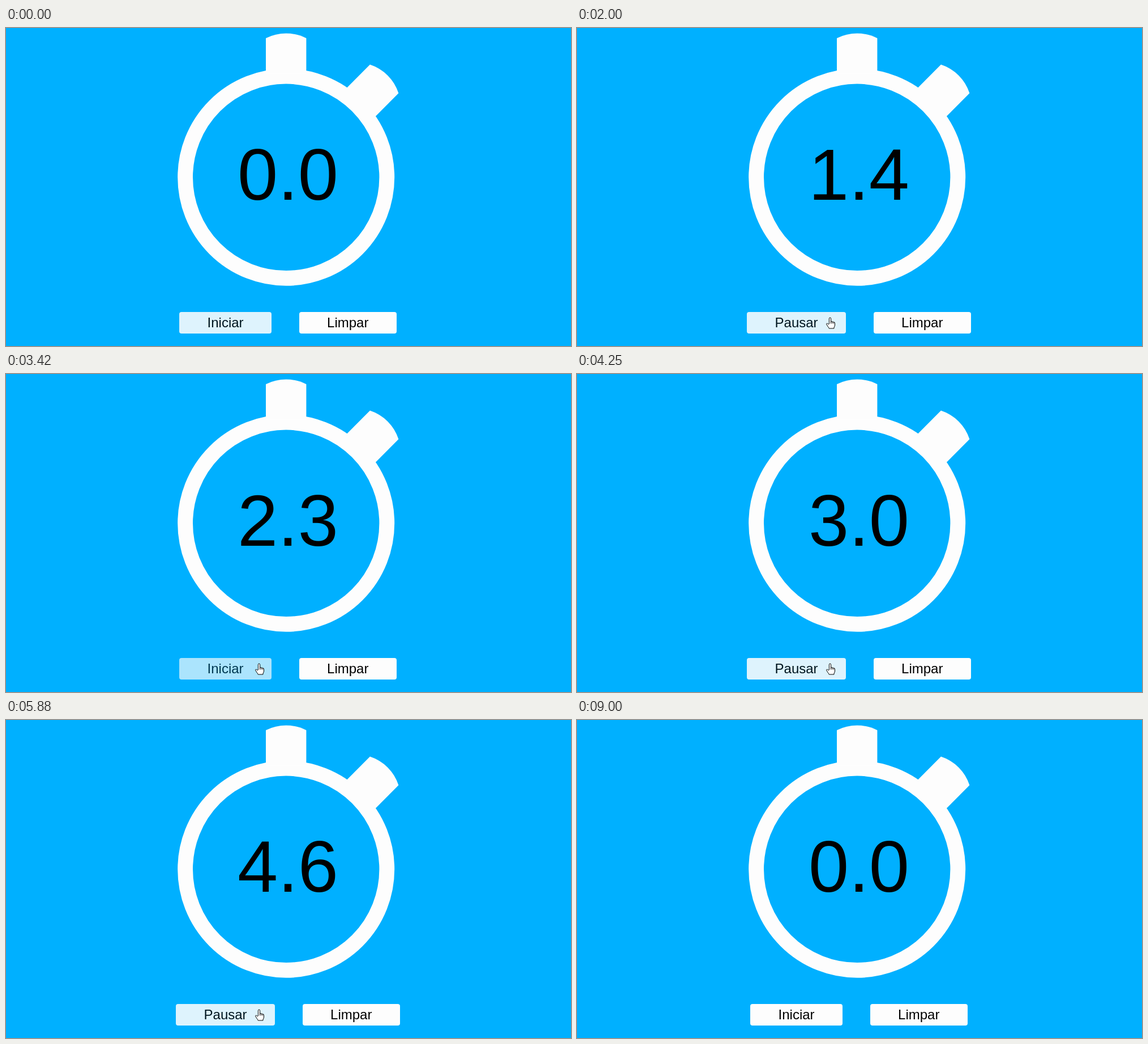
An HTML page without scripts for the animation above (9.42 s loop, 998x561 px).

```html
<!DOCTYPE html>
<html lang="pt">
<head>
<meta charset="utf-8">
<title>Cronômetro</title>
<style>
@property --tenths { syntax: "<integer>"; inherits: true; initial-value: 0; }
@property --secs { syntax: "<integer>"; inherits: true; initial-value: 0; }

html, body { margin: 0; width: 100%; height: 100%; overflow: hidden; }
body {
  --loop: 9420ms;
  position: relative;
  background: #00b0ff;
  color: #000;
  font-family: Arial, "Liberation Sans", sans-serif;
}
svg { position: absolute; left: 0; top: 0; }

/* integer rounding turns (n - 4.5) / 10 into whole seconds */
.time {
  --secs: calc((var(--tenths) - 4.5) / 10);
  position: absolute;
  left: 0;
  top: 186.5px;
  width: 996px;
  text-align: center;
  font-size: 128px;
  line-height: 144px;
  counter-reset: s var(--secs) d calc(var(--tenths) - 10 * var(--secs));
  animation: count var(--loop) step-end infinite;
}
.time::after { content: counter(s) "." counter(d); }
@keyframes count {
  0% { --tenths: 0; }
  6.263% { --tenths: 0; animation-timing-function: steps(23, end); }
  30.679% { --tenths: 23; }
  37.473% { --tenths: 23; animation-timing-function: steps(26, end); }
  65.074% { --tenths: 49; }
  80.467%, 100% { --tenths: 0; }
}

.row {
  position: absolute;
  left: 0;
  top: 501px;
  width: 996px;
  display: flex;
  justify-content: center;
  gap: 48.5px;
  font-size: 24px;
  line-height: 37.5px;
}
.row span {
  padding: 0 49.5px;
  border-radius: 4px;
  background: #fdfdfd;
}
.idle { animation: idle var(--loop) step-end infinite; }
.run { animation: run var(--loop) step-end infinite; }
.toggle { animation: toggle var(--loop) step-end infinite; }
.clear { animation: clear var(--loop) step-end infinite; }
@keyframes idle {
  0%, 31.847%, 66.348%, 100% { visibility: visible; }
  6.263%, 37.473% { visibility: hidden; }
}
@keyframes run {
  0%, 31.847%, 66.348%, 100% { visibility: hidden; }
  6.263%, 37.473% { visibility: visible; }
}
/* hover .88, pressed .68 */
@keyframes toggle {
  0%, 6.263%, 31.847%, 37.473%, 66.348% { opacity: .88; }
  5.308%, 30.998%, 36.29%, 65.393% { opacity: .68; }
  68.631%, 100% { opacity: 1; }
}
@keyframes clear {
  0%, 81.741%, 100% { opacity: 1; }
  69.798%, 80.467% { opacity: .88; }
  79.618% { opacity: .68; }
}

.cursor {
  fill: #fff;
  stroke: #000;
  stroke-linejoin: round;
  animation: move var(--loop) linear infinite, show var(--loop) step-end infinite;
}
.hand { animation: hand var(--loop) step-end infinite; }
.arrow { animation: arrow var(--loop) step-end infinite; }
@keyframes move {
  0% { transform: translate(447px, 511px); }
  66.773% { transform: translate(447px, 511px); animation-timing-function: ease-in-out; }
  74.3%, 80.679% { transform: translate(653px, 512px); }
  81.741% { transform: translate(610px, 540px); }
  84.713%, 100% { transform: translate(140px, 570px); }
}
@keyframes show {
  0%, 84.713%, 100% { opacity: 0; }
  .42% { opacity: 1; }
}
@keyframes hand {
  0%, 69.798% { visibility: visible; }
  68.631%, 81.741%, 100% { visibility: hidden; }
}
@keyframes arrow {
  0%, 69.798%, 100% { visibility: hidden; }
  68.631%, 81.741% { visibility: visible; }
}
</style>
</head>
<body>
<svg width="998" height="561" viewBox="0 0 998 561">
  <defs>
    <path id="knob" d="M-35.7-183V-245.3A79 79 0 0 1 35.7-245.3V-183Z"/>
  </defs>
  <g transform="translate(494.7 263.3)" fill="#fdfdfd">
    <circle r="178.1" fill="none" stroke="#fdfdfd" stroke-width="26.8"/>
    <use href="#knob"/>
    <use href="#knob" transform="rotate(45)"/>
  </g>
</svg>

<div class="time"></div>

<div class="row idle">
  <span class="toggle">Iniciar</span>
  <span class="clear">Limpar</span>
</div>
<div class="row run">
  <span class="toggle">Pausar</span>
  <span class="clear">Limpar</span>
</div>

<svg width="998" height="561" viewBox="0 0 998 561">
  <g class="cursor">
    <g class="hand">
      <path d="M-1.6 11V1.6a1.6 1.6 0 0 1 3.2 0V7q1.5-1 2.6.4q1.6-.8 2.4.6q1.9-.4 1.9 1.6V13q0 2-1.5 4v2H-1.8q-.6-2-2-3.2l-2.4-3.9q-.6-1.6.8-1.8t2.2 1.5z"/>
      <path fill="none" d="M1.6 7v3.5M4.2 7.4v3M6.6 8v2.5"/>
    </g>
    <path class="arrow" d="M0 0V16l3.7-3.5 2.5 5.8 2.4-1-2.5-5.7h5.2z"/>
  </g>
</svg>
</body>
</html>
```
